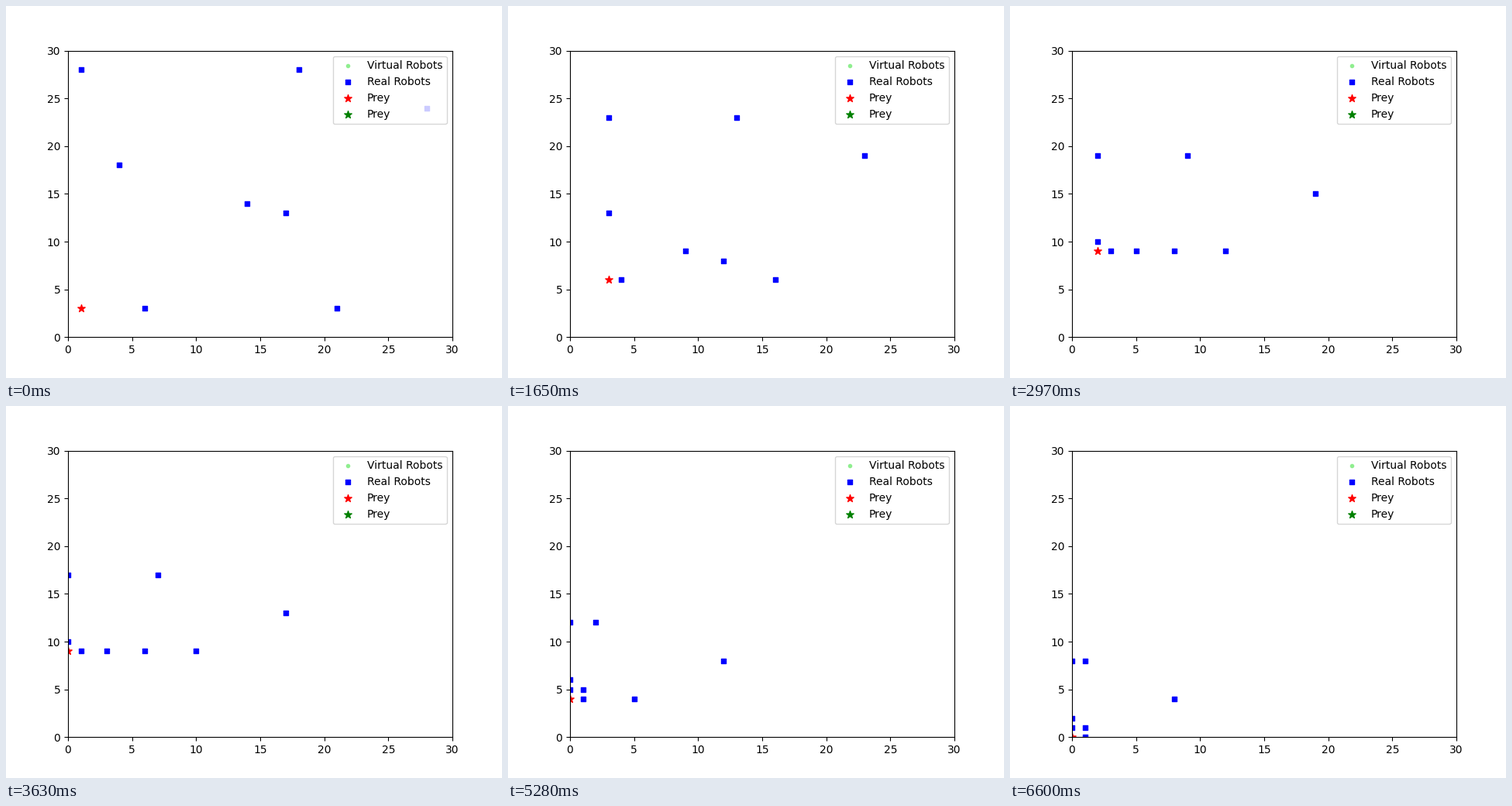
A matplotlib script for the animation above (8590 ms loop, 640 by 480 pixels).

```python
import itertools

import matplotlib.pyplot as plt
from matplotlib.animation import FuncAnimation

LOOP_MS = 8590
FRAMES = 261
FRAMES_PER_STEP = 10
SIZE = 30

# Prey route as (dx, dy, number of steps)
PREY_START = (1, 3)
PREY_LEGS = [(1, 0, 2), (0, 1, 6), (-1, 0, 3), (0, -1, 9)]

# Robots in the order in which they take their turns
ROBOTS = [(6, 3), (4, 18), (21, 3), (17, 13),
          (14, 14), (1, 28), (18, 28), (28, 24)]


def prey_route():
    x, y = PREY_START
    route = [(x, y)]
    for dx, dy, count in PREY_LEGS:
        for _ in range(count):
            x, y = x + dx, y + dy
            route.append((x, y))
    return route


def next_cell(robot, prey, taken):
    """Free neighbouring cell nearest to the prey; ties favour vertical moves."""
    x, y = robot
    cells = [(x + dx, y + dy)
             for dx, dy in itertools.product((-1, 0, 1), repeat=2)]
    free = [c for c in cells if c not in taken]
    return min(free, key=lambda c: ((c[0] - prey[0]) ** 2 + (c[1] - prey[1]) ** 2,
                                    abs(c[0] - x)))


def chase(route):
    robots = list(ROBOTS)
    history = [list(robots)]
    for prey in route[1:]:
        for i, robot in enumerate(robots):
            taken = set(robots[:i] + robots[i + 1:]) | {prey}
            robots[i] = next_cell(robot, prey, taken)
        history.append(list(robots))
    return history


route = prey_route()
history = chase(route)

plt.rcParams["font.family"] = "DejaVu Sans"
fig, ax = plt.subplots(figsize=(6.4, 4.8), dpi=100)
ax.set_xlim(0, SIZE)
ax.set_ylim(0, SIZE)

ax.scatter([], [], s=36, c="lightgreen", marker=".", label="Virtual Robots")
robot_dots = ax.scatter([], [], s=20, c="blue", marker="s", label="Real Robots")
prey_star = ax.scatter([], [], s=50, c="red", marker="*", label="Prey")
ax.scatter([], [], s=50, c="green", marker="*", label="Prey")
ax.legend(loc="upper right")


def update(frame):
    # The chase ends before the loop does, so the last pose is held.
    step = min(frame // FRAMES_PER_STEP, len(route) - 1)
    robot_dots.set_offsets(history[step])
    prey_star.set_offsets([route[step]])
    return robot_dots, prey_star


anim = FuncAnimation(fig, update, frames=FRAMES, interval=LOOP_MS / FRAMES,
                     init_func=lambda: update(0), repeat=True, repeat_delay=0)
plt.show()
```
